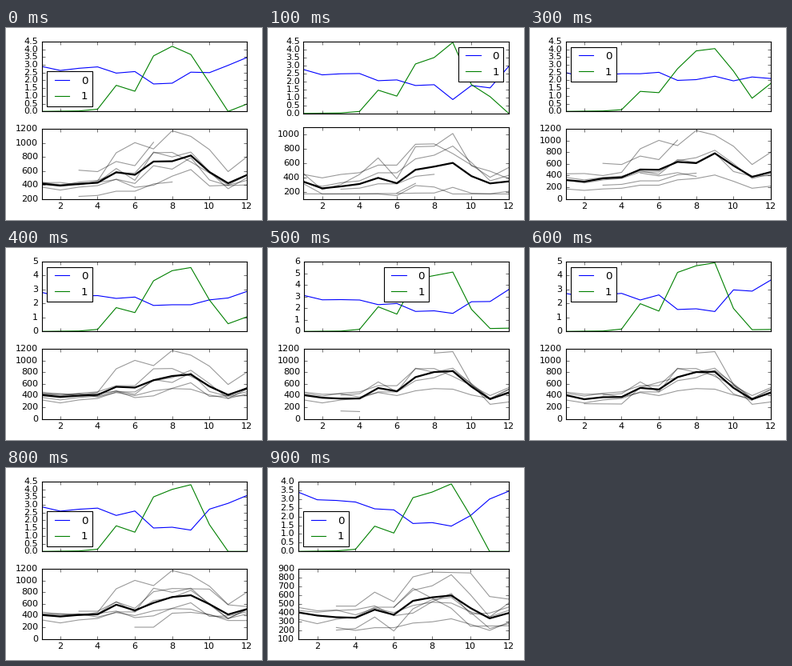
Recreate the animation shown at these times as a matplotlib script. Size 320 by 240 pixels, loop 1000 ms.

```python
import numpy as np
import matplotlib.pyplot as plt
from matplotlib.animation import FuncAnimation

W, H, DPI = 320, 240, 80
FRAMES, INTERVAL = 10, 100

plt.style.use("classic")
plt.rcParams.update({
    "font.family": "DejaVu Sans", "font.size": 10, "legend.fontsize": "large",
    "figure.facecolor": "white", "savefig.facecolor": "white",
    "savefig.dpi": DPI,
})

MONTHS = np.arange(1, 13)
# Typical year: flat winter, a climb to September, a quick fall.
SEASON = np.array([0, -.1, 0, .05, .27, .27, .65, .75, 1, .55, .05, .2])


def path(points):
    """Straight lines through {month: value}, nothing outside of them."""
    return np.interp(MONTHS, list(points), list(points.values()),
                     left=np.nan, right=np.nan)


def season(base, swell, bends=None, first=1, last=12):
    """The typical year, scaled, with a few months that depart from it."""
    year = base + swell * SEASON
    for month, value in (bends or {}).items():
        year[month - 1] = value
    year[(MONTHS < first) | (MONTHS > last)] = np.nan
    return year


SERIES = {
    "A": path({1: 430, 2: 435, 3: 400, 4: 455, 5: 860, 6: 1005, 7: 915,
               8: 1175, 9: 1095, 10: 905, 11: 590, 12: 800}),
    "B": path({3: 610, 4: 590, 5: 735, 6: 675, 7: 1010}),
    "C": season(235, 275, first=3, last=8),
    "D": season(300, 710, {1: 450, 4: 440, 5: 670, 6: 380, 7: 825, 10: 560,
                           11: 485, 12: 380}),
    "E": season(440, 480, {7: 860, 8: 865, 9: 730, 10: 570, 11: 400}),
    "F": season(325, 510),
    "G": season(430, 80, {1: 460, 4: 375, 6: 400, 8: 520, 10: 410, 11: 350,
                          12: 510}),
    "H": season(410, 460, {5: 635, 6: 465, 7: 870, 8: 800, 10: 590, 11: 345},
                first=3),
    "I": path({3: 475, 4: 475, 5: 635, 6: 525, 7: 810, 8: 865, 10: 855,
               11: 585, 12: 555}),
    "J": season(425, 195, {6: 365, 7: 395, 8: 525, 10: 385, 11: 395}),
    "K": season(368, 422, {6: 420, 7: 675, 8: 625, 10: 470, 12: 400}),
    "L": season(168, 0, {1: 310, 6: 145, 7: 285, 8: 265}),
    "M": season(170, 240),
    "N": season(85, 80, first=3, last=10),
    "O": season(200, 375, {5: 350, 6: 190, 8: 550}, first=3),
    "P": season(190, 140, {3: 230, 12: 290}, first=3),
    "Q": path({6: 200, 7: 200, 8: 440, 9: 455, 10: 420, 11: 315, 12: 315}),
    "R": path({2: 260, 4: 255, 5: 540, 8: 800, 9: 760, 10: 430, 11: 315}),
    "S": path({3: 135, 4: 125}),
    "T": path({8: 1130, 9: 1155, 10: 590, 11: 250, 12: 290}),
    "U": path({6: 180, 7: 315}),
    "V": path({6: 410, 7: 450, 8: 400, 9: 510, 10: 370, 11: 350}),
    "W": path({6: 460, 7: 680, 9: 450, 10: 245, 12: 250}),
    "X": path({5: 445, 6: 395, 7: 450, 8: 385}),
    "Z": season(170, 15, {9: 260, 12: 205}),
}


def winter_factor(jan, apr, may, jun, jul, sep, octo, nov, dec):
    curve = path({1: jan, 4: apr, 5: may, 6: jun, 7: jul, 8: jul + .05,
                  9: sep, 10: octo, 11: nov, 12: dec})
    curve[1:3] -= .25, .1
    return curve


def summer_factor(jul, aug, sep, octo, nov, dec):
    """Spring follows from how strong the summer is."""
    return path({1: 0, 3: .03, 4: .04 * jul, 5: .47 * jul, 6: .31 * aug,
                 7: jul, 8: aug, 9: sep, 10: octo, 11: nov, 12: dec})


scenes = {}


def add_scene(index, members, upper, lower, blue, green):
    """upper is (max, step) and lower is (min, max, step) of the y axes."""
    scenes[index] = dict(members=members, upper=upper, lower=lower,
                         blue=blue, green=green)


def add_between(index, members, upper):
    before, after = scenes[index - 1], scenes[index + 1]
    add_scene(index, members, upper, (0, 1200, 200),
              (before["blue"] + after["blue"]) / 2,
              (before["green"] + after["green"]) / 2)


add_scene(0, "ABCEHJK", (4.5, .5), (200, 1200, 200),
          winter_factor(2.9, 2.87, 2.47, 2.57, 1.77, 2.53, 2.5, 2.97, 3.47),
          summer_factor(3.58, 4.2, 3.67, 1.85, 0, .47))
add_scene(1, "CDEFLUZ", (4.5, .5), (100, 1100, 200),
          winter_factor(2.75, 2.5, 2.05, 2.1, 1.75, .87, 1.75, 1.6, 2.95),
          summer_factor(3.1, 3.5, 4.45, 1.8, 1.05, 0))
add_scene(2, "FJLNOVZ", (4, .5), (0, 900, 100),
          winter_factor(2.94, 2.64, 2.05, 1.94, 1.27, 1.38, 1.37, 2.55, 2.7),
          summer_factor(2.58, 2.95, 3.55, 1.95, .03, .3))
add_scene(3, "ABCFKMX", (4.5, .5), (0, 1200, 200),
          winter_factor(2.5, 2.43, 2.43, 2.52, 2, 2.27, 1.97, 2.22, 2.12),
          summer_factor(2.75, 3.9, 4.05, 2.6, .85, 1.8))
add_scene(5, "EFGHST", (6, 1), (0, 1200, 200),
          winter_factor(3.1, 2.7, 2.3, 2.4, 1.72, 1.55, 2.55, 2.57, 3.6),
          summer_factor(4.5, 4.8, 5.1, 1.9, .25, .28))
add_scene(7, "ABHIQRT", (5, 1), (0, 1200, 200),
          winter_factor(2.35, 2.75, 2.2, 2.83, 1.42, 1.3, 3.4, 3.2, 3.75),
          summer_factor(3.95, 4.6, 4.73, 1.4, 0, 0))
add_scene(9, "FGIJOPW", (4, .5), (100, 900, 100),
          winter_factor(3.4, 2.83, 2.44, 2.38, 1.6, 1.45, 2.05, 3, 3.45),
          summer_factor(3.08, 3.4, 3.87, 2.05, 0, 0))
add_between(4, "AEFGJK", (5, 1))
add_between(6, "EFGHRT", (5, 1))
add_between(8, "AFGHIJQ", (4.5, .5))

fig, (top_ax, low_ax) = plt.subplots(2, figsize=(W / DPI, H / DPI), dpi=DPI)


def setup(ax, low, high, step):
    ax.set_xlim(1, 12)
    ax.set_xticks(range(2, 13, 2))
    first = np.ceil(low / step) * step
    ax.set_yticks(np.arange(first, high + step / 10, step))
    ax.set_ylim(low, high)


def draw_factors(scene):
    top_ax.clear()
    top_ax.plot(MONTHS, scene["blue"], "b", label="0")
    top_ax.plot(MONTHS, scene["green"], "g", label="1")
    setup(top_ax, 0, *scene["upper"])
    top_ax.set_xticklabels([])
    top_ax.legend(loc="best", framealpha=1)


def draw_members(scene):
    low_ax.clear()
    rows = np.array([SERIES[key] for key in scene["members"]])
    for row in rows:
        low_ax.plot(MONTHS, row, "k", alpha=.4)
    low_ax.plot(MONTHS, np.nanmean(rows, axis=0), "k", lw=2)
    setup(low_ax, *scene["lower"])


def update(index):
    draw_factors(scenes[index])
    draw_members(scenes[index])
    fig.tight_layout()
    return top_ax, low_ax


anim = FuncAnimation(fig, update, frames=FRAMES, interval=INTERVAL,
                     init_func=lambda: update(0), repeat=True, repeat_delay=0)
plt.show()
```
